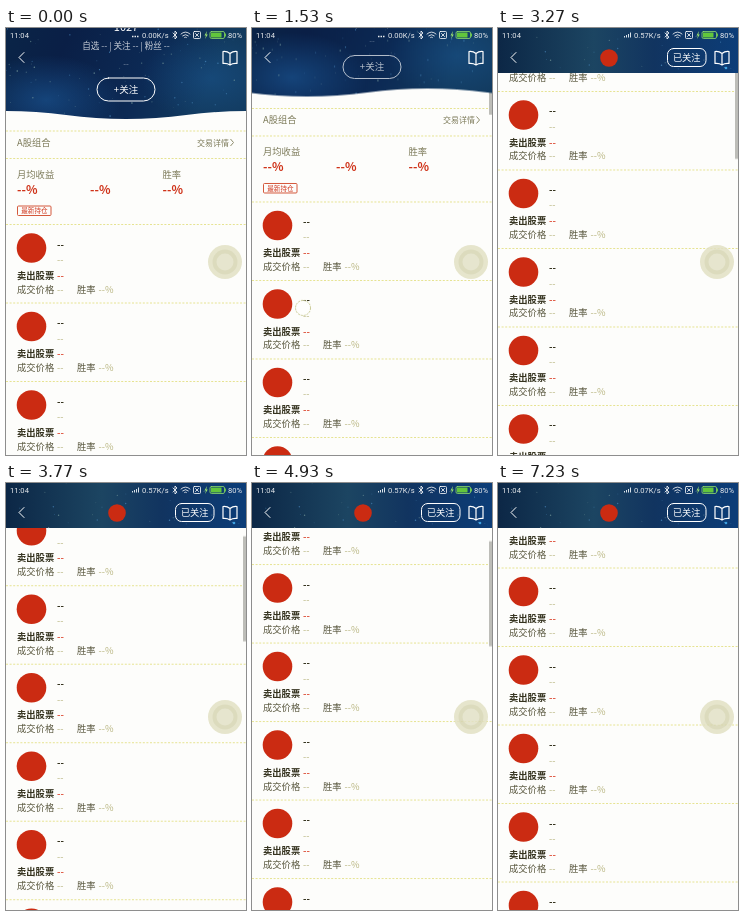
Animation of 240 by 427 pixels, one loop 8.39 s. Source, as an HTML page:

```html
<!DOCTYPE html>
<html lang="zh">
<head>
<meta charset="utf-8">
<title>组合列表</title>
<style>
html, body { margin: 0; width: 100%; height: 100%; overflow: hidden; background: #fdfdfb; }
svg { display: block; width: 100%; height: 100%; font: 9.3px "Noto Sans CJK SC", "Noto Sans CJK", sans-serif; }
.latin { font-family: Roboto, sans-serif; }
.bold { font-weight: 700; }
.mid { text-anchor: middle; }
.dark { fill: #35331f; }
.soft { fill: #57553c; }
.label { fill: #7d7b5a; }
.pale { fill: #b9b681; }
.red { fill: #cf3218; }
.pink { fill: #e0604c; }
.rule { stroke: #e6e392; stroke-dasharray: 2 1.6; }
.line { fill: none; stroke: #fff; stroke-linecap: round; stroke-linejoin: round; }

.scroll, .thumb, .fade, .bar, .tools, .touch, .shown, .net { animation: 8390ms linear infinite; }
.scroll { --k: -1px; animation-name: scroll; }
.thumb { --k: .233px; animation-name: scroll; }
.shown { animation-name: shown; }
.fade { animation-name: fade; }
.bar { animation-name: bar; }
.tools { animation-name: tools; }
.touch { animation-name: touch; }
.wave { animation: wave 2097.5ms linear infinite; }
.net { animation-timing-function: step-end; }
.n1 { animation-name: net1; }
.n2 { animation-name: net2; }
.n3 { animation-name: net3; }

/* Each swipe starts fast and glides out. */
@keyframes scroll {
  0%, 16.8% { transform: translateY(0); }
  18.24% { transform: translateY(calc(22.4 * var(--k))); animation-timing-function: ease-out; }
  30.63% { transform: translateY(calc(124 * var(--k))); animation-timing-function: ease-out; }
  38.97% { transform: translateY(calc(211.5 * var(--k))); animation-timing-function: ease-in-out; }
  50.42% { transform: translateY(calc(430.5 * var(--k))); animation-timing-function: ease-out; }
  58.76% { transform: translateY(calc(350.5 * var(--k))); animation-timing-function: ease-out; }
  60%, 100% { transform: translateY(calc(347 * var(--k))); }
}
@keyframes wave { to { transform: translateX(240px); } }
@keyframes shown {
  0%, 16.8% { opacity: 0; }
  17.2%, 62.3% { opacity: 1; }
  68.8%, 100% { opacity: 0; }
}
@keyframes fade {
  0%, 16.8% { opacity: 1; }
  18.24% { opacity: .7; animation-timing-function: ease-out; }
  30.63%, 100% { opacity: 0; }
}
@keyframes bar {
  0%, 18.24% { opacity: 0; animation-timing-function: ease-out; }
  30.63% { opacity: .78; animation-timing-function: ease-out; }
  35%, 100% { opacity: 1; }
}
@keyframes tools {
  0%, 18.24% { opacity: 0; animation-timing-function: ease-out; }
  30.63%, 100% { opacity: 1; }
}
@keyframes touch {
  0%, 16.7% { opacity: 0; transform: translate(51px, 302px); }
  16.8% { opacity: 1; transform: translate(51px, 302px); }
  18.24% { opacity: 1; transform: translate(51px, 280px); }
  21% { opacity: 1; transform: translate(53px, 238px); }
  21.1%, 29.4% { opacity: 0; transform: translate(57px, 272px); }
  29.5% { opacity: 1; transform: translate(57px, 272px); }
  30.63% { opacity: 1; transform: translate(57px, 264px); }
  32.5% { opacity: 1; transform: translate(58px, 234px); }
  32.6%, 49.4% { opacity: 0; transform: translate(47px, 262px); }
  49.5% { opacity: .7; transform: translate(47px, 262px); }
  50.42% { opacity: .7; transform: translate(47px, 267px); }
  53% { opacity: .7; transform: translate(49px, 305px); }
  53.1%, 100% { opacity: 0; transform: translate(49px, 305px); }
}
@keyframes net1 { 0% { opacity: 1; } 24%, 100% { opacity: 0; } }
@keyframes net2 { 0% { opacity: 0; } 24% { opacity: 1; } 72.35%, 100% { opacity: 0; } }
@keyframes net3 { 0% { opacity: 0; } 72.35%, 100% { opacity: 1; } }
</style>
</head>
<body>
<svg viewBox="0 0 240 427">
  <defs>
    <linearGradient id="sky" x2="1" y2=".35">
      <stop offset="0" stop-color="#0a2848"/>
      <stop offset=".4" stop-color="#0a1f46"/>
      <stop offset=".75" stop-color="#0c2a55"/>
      <stop offset="1" stop-color="#123a5e"/>
    </linearGradient>
    <linearGradient id="dusk">
      <stop offset="0" stop-color="#0c2746"/>
      <stop offset=".4" stop-color="#1c4562"/>
      <stop offset=".65" stop-color="#113460"/>
      <stop offset="1" stop-color="#0c3d78"/>
    </linearGradient>
    <radialGradient id="glow">
      <stop offset="0" stop-color="#1c5c9c" stop-opacity=".6"/>
      <stop offset="1" stop-color="#1c5c9c" stop-opacity="0"/>
    </radialGradient>
    <clipPath id="sea">
      <path class="wave" d="M-300 87q60-8 120 0t120 0 120 0 120 0 120 0 120 0V-100H-300Z"/>
    </clipPath>
    <path id="signal" d="M126.5 9.5v-1.5M128.5 9.5v-2.5M130.5 9.5v-3.5M132.5 9.5v-5" stroke="#d9e2ea"/>
    <g id="row">
      <path class="rule" d="M0-23.5H240"/>
      <circle cx="25.5" r="14.8" fill="#cb2b12"/>
      <text class="dark bold" x="51" y="-.5">--</text>
      <text class="pale" x="51" y="15">--</text>
      <text class="dark bold" x="11" y="30.7">卖出股票</text>
      <text class="pink bold" x="51" y="30.7">--</text>
      <text class="soft" x="11" y="44.5">成交价格</text>
      <text class="pale" x="51" y="44.5">--</text>
      <text class="soft" x="71" y="44.5">胜率</text>
      <text class="pale" x="92.5" y="44.5">--%</text>
    </g>
  </defs>

  <rect width="240" height="427" fill="#fdfdfb"/>

  <g class="scroll">
    <path class="rule" d="M0 103H240M0 130.5H240"/>
    <text class="label" x="11" y="117.7">A股组合</text>
    <text class="label" x="191" y="117.5" font-size="8">交易详情</text>
    <path d="M224.5 111l3 3.5-3 3.5" fill="none" stroke="#8d8b6b"/>
    <text class="label" x="11" y="149.5">月均收益</text>
    <text class="label" x="156.5" y="149.5">胜率</text>
    <g class="red bold" font-size="12">
      <text x="11" y="165.5">--%</text>
      <text x="84" y="165.5">--%</text>
      <text x="156.5" y="165.5">--%</text>
    </g>
    <rect x="11.5" y="178" width="33.5" height="9.5" rx="1" fill="none" stroke="#d4593c"/>
    <text class="red mid" x="28.4" y="185.4" font-size="6.6">最新持仓</text>
    <g id="rows"></g>
  </g>

  <g class="shown"><rect class="thumb" x="237" y="-23.4" width="3" height="105" fill="#bdbdb8"/></g>

  <g class="scroll">
    <g clip-path="url(#sea)">
      <rect y="-100" width="240" height="200" fill="url(#sky)"/>
      <ellipse cx="40" cy="72" rx="75" ry="45" fill="url(#glow)"/>
      <ellipse cx="205" cy="50" rx="70" ry="45" fill="url(#glow)" opacity=".7"/>
      <g id="heroStars"></g>
    </g>
    <g class="fade mid" fill="#fff">
      <text x="120" y="2.5" font-size="11">1027</text>
      <text x="120" y="20.5" font-size="8.6" fill="#c6ccd6">自选 -- | 关注 -- | 粉丝 --</text>
      <text x="120" y="39" font-size="8" fill="#8291a8">--</text>
      <rect class="line" x="91" y="50" width="58" height="23" rx="11.5" stroke="#d7dcc0"/>
      <text x="120" y="65" font-size="9.5">+关注</text>
    </g>
  </g>

  <g class="bar">
    <rect width="240" height="45" fill="url(#dusk)"/>
    <g id="barStars"></g>
  </g>
  <g class="tools">
    <circle cx="111" cy="30" r="8.8" fill="#cb2b12"/>
    <rect class="line" x="169.5" y="20.5" width="38.5" height="18" rx="6"/>
    <text class="mid" x="188.7" y="33" font-size="9.2" fill="#fff">已关注</text>
  </g>

  <path class="line" d="M18 24.5l-5 5 5 5"/>
  <path class="line" stroke-width="1.2" d="M224 25.5Q221 23 217 23.5V35.5Q221 35 224 37 227 35 231 35.5V23.5Q227 23 224 25.5V36"/>

  <g class="latin" fill="#e8ebee" font-size="7.6">
    <text x="4" y="9.7">11:04</text>
    <g class="net n1">
      <path d="M126 8.5h1.5m1 0H130m1 0h1.5" stroke="#e8ebee" stroke-width="1.5"/>
      <text x="136" y="9.7">0.00K/s</text>
    </g>
    <g class="net n2"><use href="#signal"/><text x="136" y="9.7">0.57K/s</text></g>
    <g class="net n3"><use href="#signal"/><text x="136" y="9.7">0.07K/s</text></g>
    <text x="222" y="9.7">80%</text>
  </g>
  <g class="line" stroke-width=".8">
    <path d="M167 5l4 4-2 2V3l2 2-4 4"/>
    <path d="M175 6q4.5-4 9 0M176.7 7.8q2.8-2.4 5.6 0M178.6 9.4q.9-.7 1.8 0"/>
    <rect x="187.5" y="3.5" width="7" height="7" rx="1"/>
    <path d="M189.5 5.5l3 3m0-3l-3 3"/>
    <rect x="204" y="3.5" width="14.5" height="7" rx="1.5" stroke="#8fdc6a"/>
  </g>
  <path d="M201 3l-2.5 4.5h1.5L199 11l2.8-4.5h-1.5z" fill="#9be070"/>
  <path d="M205 4.5h10.5v5H205zM219 5.5h1v3h-1z" fill="#62c63c"/>

  <g opacity=".85">
    <circle cx="219" cy="234" r="17" fill="#e2e1c4"/>
    <circle cx="219" cy="234" r="12.5" fill="#d6d5b2"/>
    <circle cx="219" cy="234" r="8.5" fill="#e2e1c6"/>
  </g>
  <circle class="touch" r="7.5" fill="#fff" fill-opacity=".6" stroke="#c5c58c" stroke-dasharray="2 1"/>
</svg>
<script>
const NS = "http://www.w3.org/2000/svg";
const add = (id, tag, attrs) => {
  const el = document.createElementNS(NS, tag);
  for (const key in attrs) el.setAttribute(key, attrs[key]);
  document.getElementById(id).append(el);
};

for (let i = 0; i < 12; i++) add("rows", "use", { href: "#row", y: 220 + 78.5 * i });

let seed = 11;
const random = () => (seed = seed * 16807 % 2147483647) / 2147483647;
const scatter = (id, count, top, height) => {
  for (let i = 0; i < count; i++) add(id, "circle", {
    cx: random() * 240, cy: top + random() * height, r: .3 + random() * .5,
    fill: random() < .5 ? "#4f8fc4" : "#86a9a6", opacity: .3 + random() * .5
  });
};
scatter("heroStars", 90, 0, 95);
scatter("barStars", 35, 0, 45);
add("barStars", "circle", { cx: 228, cy: 40, r: 1.3, fill: "#3da0e0" });
</script>
</body>
</html>
```
